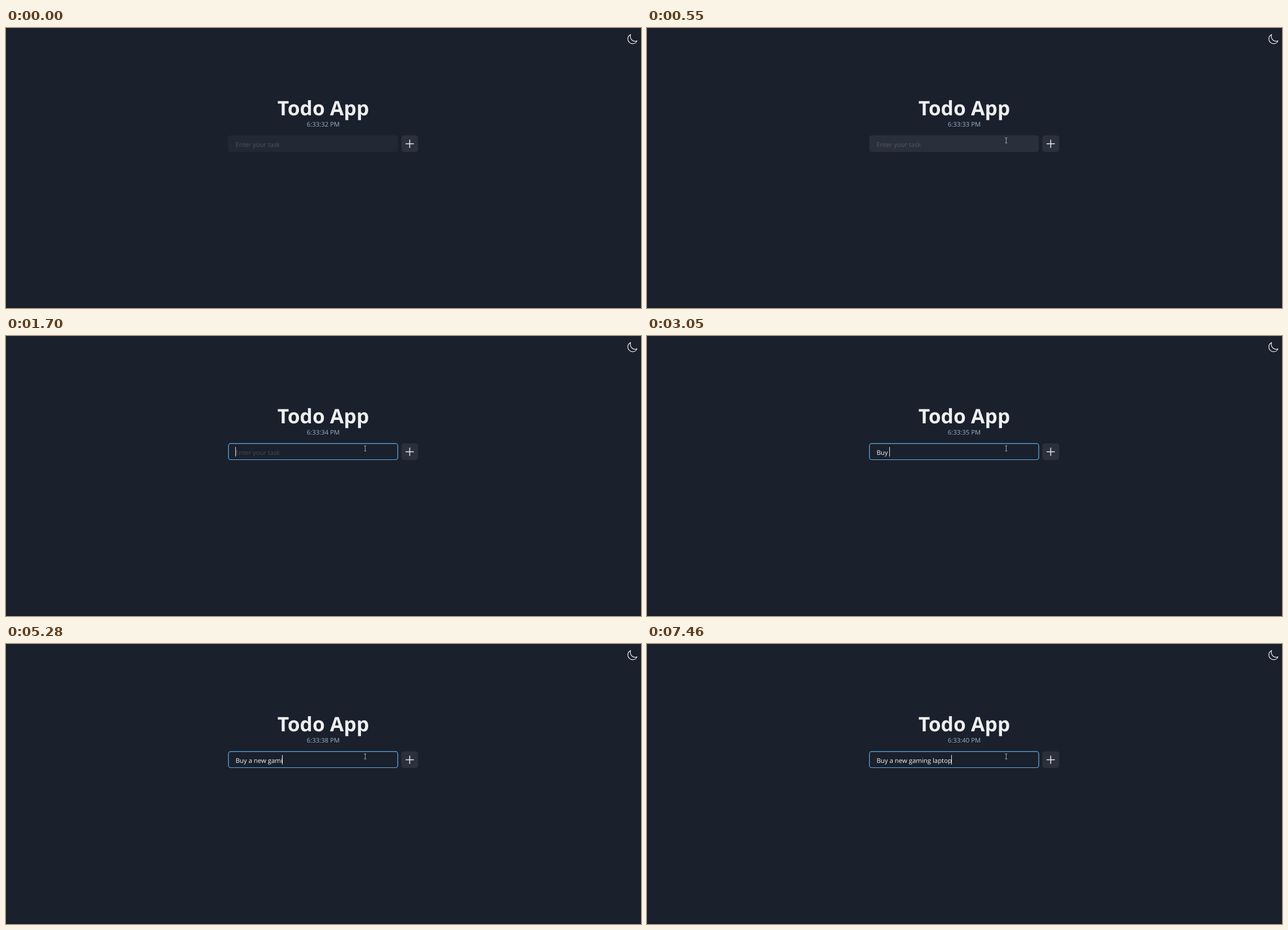
Write an HTML page that moves like this. It is 1127 by 497 pixels and loops after 7.99 s.

```html
<!DOCTYPE html>
<html lang="en">
<head>
<meta charset="utf-8">
<title>Todo App</title>
<style>
  html, body { margin: 0; width: 100%; height: 100%; overflow: hidden; background: #1a202c; }
  svg { display: block; width: 1127px; height: 497px; }
  text { font: 11.38px "Open Sans", "Noto Sans", sans-serif; fill: #f6f7f8; text-rendering: geometricPrecision; white-space: pre; }
  .title { font-size: 35.4px; font-weight: 700; fill: #eeeff0; }
  .clock { fill: #a0aec0; }
  .hint { font-size: 11.2px; fill: #fff; fill-opacity: .2; }
</style>
</head>
<body>
<svg viewBox="0 0 1127 497">
  <rect width="1127" height="497" fill="#1a202c"/>
  <rect y="496" width="1127" height="1" fill="#171c26"/>

  <path transform="translate(1101.75 9.75) scale(.0390625)" fill="none" stroke="#ecedee" stroke-width="32" stroke-linejoin="round"
    d="M160 136c0-30.62 4.51-61.61 16-88C99.57 81.27 48 159.32 48 248c0 119.29 96.71 216 216 216 88.68 0 166.73-51.57 200-128-26.39 11.49-57.38 16-88 16-119.29 0-216-96.71-216-216z"/>

  <text class="title" x="563" y="155.3" text-anchor="middle">Todo App</text>
  <text class="clock" id="clock" x="563" y="175" text-anchor="middle"></text>

  <rect id="field" x="394.5" y="190.5" width="301" height="29.5" rx="4.5" fill="#fff"/>
  <rect id="ring" x="394.8" y="190.9" width="300.5" height="28.6" rx="4" fill="none" stroke="#63b3ed" stroke-width="1.2"/>
  <text class="hint" id="hint" x="407.3" y="210.5">Enter your task</text>
  <text id="task" x="407.5" y="210.5" xml:space="preserve"></text>
  <rect id="caret" y="197" width="1" height="17" fill="#ecedee"/>

  <rect x="701.7" y="190.5" width="29.8" height="29.5" rx="4.5" fill="#fff" fill-opacity=".08"/>
  <path d="M709.75 205.4h13.5M716.5 198.65v13.5" stroke="#ecedee" stroke-width="1.5" stroke-linecap="round"/>

  <path id="arrow" d="M0 0V11.5L2.7 9 4.4 12.8 6.1 12 4.4 8.3H8Z" fill="#fff" stroke="#000" stroke-width=".6"/>
  <path id="beam" d="M-2 -4.5H2M0 -4.5V4.5M-2 4.5H2" fill="none" stroke="#b4b8bd" stroke-width=".9"/>
</svg>
<script>
const LOOP = 7990;
const ENTER = 90, HOVER = 405, ARRIVE = 440, FOCUS = 700, FADE = 200;
// Each burst types its text at a steady pace.
const BURSTS = [
  { text: "Buy ", start: 2070, gap: 130 },
  { text: "a n", start: 3290, gap: 200 },
  { text: "ew ", start: 4110, gap: 170 },
  { text: "gaming ", start: 4820, gap: 125 },
  { text: "lap", start: 5960, gap: 110 },
  { text: "top", start: 6700, gap: 80 },
];

const [clock, field, ring, hint, task, caret, arrow, beam] =
  ["clock", "field", "ring", "hint", "task", "caret", "arrow", "beam"].map(id => document.getElementById(id));

const show = (node, on) => node.setAttribute("visibility", on ? "visible" : "hidden");
const setText = (node, text) => { if (node.textContent !== text) node.textContent = text; };
const easeOut = (t, start, duration) => {
  const p = Math.min(1, Math.max(0, (t - start) / duration));
  return 1 - (1 - p) ** 2;
};
const bezier = (a, b, c, u) => a * (1 - u) ** 2 + 2 * b * u * (1 - u) + c * u * u;

function typing(t) {
  let typed = "", lastKey = FOCUS;
  for (const { text, start, gap } of BURSTS) {
    if (t < start) break;
    const count = Math.min(text.length, 1 + Math.floor((t - start) / gap));
    typed += text.slice(0, count);
    lastKey = start + (count - 1) * gap;
  }
  return { typed, idle: t - lastKey };
}

function draw(t) {
  setText(clock, `6:33:${33 + Math.floor((t - 375) / 980)} PM`);

  const hover = easeOut(t, HOVER, FADE), focus = easeOut(t, FOCUS - 50, FADE);
  field.setAttribute("fill-opacity", (.04 + .035 * hover) * (1 - focus));
  ring.setAttribute("stroke-opacity", focus);

  const { typed, idle } = typing(t);
  setText(task, typed);
  show(hint, !typed);
  const width = typed ? task.getComputedTextLength() : 0;
  caret.setAttribute("x", Math.round(407 + width));
  // The caret goes dark once in each pause.
  const blink = typed ? 295 : 500;
  show(caret, idle >= 0 && Math.floor(idle / blink) !== 1);

  const u = easeOut(t, ENTER, ARRIVE - ENTER);
  const x = bezier(1066, 690, 637.5, u), y = bezier(488, 250, 199.5, u);
  for (const pointer of [arrow, beam]) pointer.setAttribute("transform", `translate(${x} ${y})`);
  show(arrow, t >= ENTER && t < HOVER);
  show(beam, t >= HOVER);
}

const start = performance.now();
function frame() {
  draw((performance.now() - start) % LOOP);
  requestAnimationFrame(frame);
}
frame();
</script>
</body>
</html>
```
